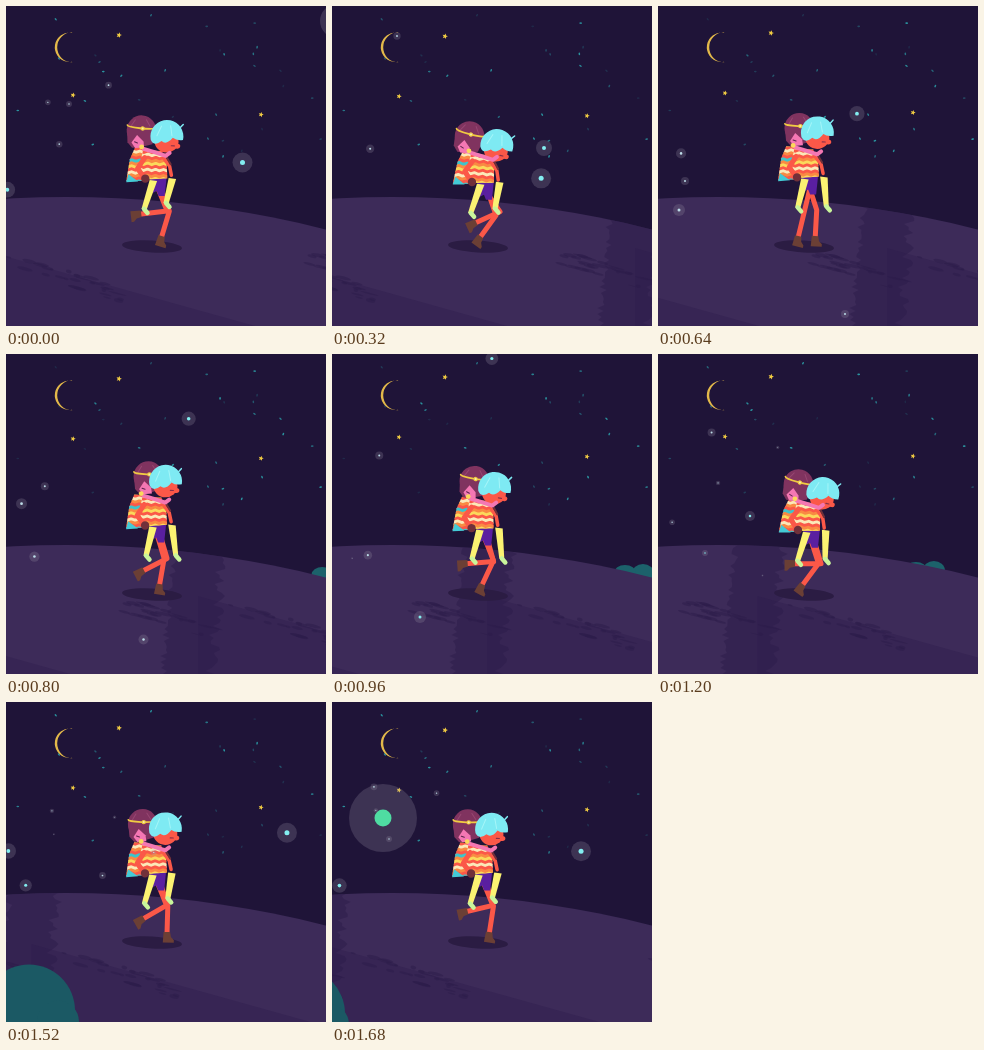
An HTML page with a canvas that plays this animation: 320x320 px, repeating every 1.76 s.

```html
<!DOCTYPE html>
<html>
<head>
<meta charset="utf-8">
<style>
html, body { margin: 0; width: 100%; height: 100%; overflow: hidden; background: #1f1438; }
canvas { display: block; }
</style>
</head>
<body>
<canvas id="stage" width="320" height="320"></canvas>
<script>
const ctx = document.getElementById('stage').getContext('2d');
const TAU = Math.PI * 2, STEP = 80, STEPS = 22;
const RED = '#fb5848', PINK = '#f477b3', BOOT = '#6b3f35', YELLOW = '#f0cb42', SHADE = 'rgba(45,28,74,.5)';

const mod = (a, n) => (a % n + n) % n;
const lerp = (a, b, u) => a + (b - a) * u;
const linear = u => u, easeIn = u => u * u, easeOut = u => 1 - (1 - u) ** 2;
// Waves over the whole loop (two paces) and over one pace, peaking at the given step.
const slow = (k, peak) => Math.cos(TAU * (k - peak) / STEPS);
const quick = (k, peak) => Math.cos(2 * TAU * (k - peak) / STEPS);

function random(seed) {
  return () => (seed = seed * 16807 % 2147483647) / 2147483647;
}
function oval(x, y, rx, ry, color, angle = 0) {
  ctx.fillStyle = color;
  ctx.beginPath();
  ctx.ellipse(x, y, rx, ry, angle, 0, TAU);
  ctx.fill();
}
const disc = (x, y, r, color) => oval(x, y, r, r, color);
function trace(points) {
  ctx.beginPath();
  points.forEach(p => ctx.lineTo(...p));
}
function shape(points, color) {
  trace(points);
  ctx.fillStyle = color;
  ctx.fill();
}
function limb(points, width, color) {
  trace(points);
  ctx.strokeStyle = color;
  ctx.lineWidth = width;
  ctx.lineCap = ctx.lineJoin = 'round';
  ctx.stroke();
}
function within([x, y], angle, draw) {
  ctx.save();
  ctx.translate(x, y);
  ctx.rotate(angle);
  draw();
  ctx.restore();
}

function star(x, y, size) {
  shape(Array.from({ length: 10 }, (_, i) => {
    const r = i % 2 ? size * .45 : size, a = i * TAU / 10 - 1.3;
    return [x + r * Math.cos(a), y + r * Math.sin(a)];
  }), YELLOW);
}

function sky(k) {
  ctx.fillStyle = '#1f1438';
  ctx.fillRect(0, 0, 320, 320);
  const rnd = random(4711);
  for (let i = 0; i < 30; i++) {
    ctx.globalAlpha = .55 + .4 * slow(k, i * 5);
    oval(rnd() * 320, rnd() * 155, 1.4, .8, '#2b9aa4', i);
  }
  ctx.globalAlpha = 1;
  const sway = 4 * slow(k, 3);
  star(113, 26.5 + sway, 2.9);
  star(67, 86.5 + sway, 2.7);
  star(255, 106 + sway, 2.7);
  ctx.beginPath();
  ctx.arc(63.5, 41.3, 14.7, -1.4, 1.4, true);
  ctx.arc(66.2, 41.3, 15, Math.PI / 2, -Math.PI / 2);
  ctx.fillStyle = '#e3b94a';
  ctx.fill();
}

function farBush(k) {
  const x = 302 - 11.7 * (k - 12), y = 231 - k;
  if (k < 10 || k > 18) return;
  oval(x + 9, y, 11, 9, '#1c626b');
  oval(x - 9, y, 11, 8, '#1c626b');
}

function nearBush(k) {
  const x = 23 - 28 * (k - 19), y = 306 + 3.9 * (k - 19.8) ** 2;
  disc(x, y, 46, '#1b5964');
  disc(x + 29, y + 11, 21, '#1b5964');
}

function ground(k) {
  const WIDTH = 407, shift = k * WIDTH / STEPS;
  ctx.save();
  ctx.beginPath();
  ctx.arc(60, 1247, 1056, 0, TAU);
  ctx.fillStyle = '#3d2b59';
  ctx.fill();
  ctx.clip();
  for (const start of [-shift, WIDTH - shift]) {
    const rnd = random(71);
    ctx.save();
    ctx.translate(start, 0);
    const left = [], right = [];
    for (let y = 185; y <= 325; y += 3) {
      const lean = (y - 200) * -.1;
      left.push([-58 + lean + rnd() * 9, y]);
      right.unshift([-12 + lean + rnd() * 14, y]);
    }
    shape(left.concat(right), SHADE);
    shape([[-30, 242], [260, 323], [-30, 323]], 'rgba(45,28,74,.35)');
    for (let i = 0; i < 60; i++) {
      const spread = rnd() + rnd() - 1;
      const x = lerp(75, 345, i % 2) + spread * 75, y = 268 + spread * 22 + rnd() * 16 - 12 * (i % 2);
      oval(x, y, 2 + rnd() * 8, .5 + rnd() * 1.5, SHADE, .25);
    }
    ctx.restore();
  }
  ctx.restore();
  oval(146, 240.5, 30, 6, '#2b1c43', .06);
}

// Ankle on a stride: it slides back on the ground, then swings up behind and forward.
function stride(step) {
  const p = mod(step, STEPS) / 11;
  if (p < 1) return [161 - 21 * p, 232];
  const lift = Math.sin(Math.PI * (p - 1));
  return [140 + 21 * (p - 1) ** 6 - 7 * lift, 232 - 24 * lift ** .8];
}

function leg(hip, ankle) {
  const BONE = 28, dx = ankle[0] - hip[0], dy = ankle[1] - hip[1], reach = Math.hypot(dx, dy);
  const bend = Math.sqrt(Math.max(0, BONE ** 2 - reach ** 2 / 4)) / reach;
  const knee = [hip[0] + dx / 2 + dy * bend, hip[1] + dy / 2 - dx * bend];
  limb([hip, knee, ankle], 5, RED);
  const angle = Math.atan2(ankle[1] - knee[1], ankle[0] - knee[0]) - Math.PI / 2;
  within(ankle, angle, () => shape([[-3.5, -2], [3, -2], [4, 3], [7, 6], [7, 8.5], [-4, 8.5]], BOOT));
}

function stocking(knee, foot) {
  const [kx, ky] = knee, [fx, fy] = foot;
  shape([[kx - 4, ky - 3], [kx + 3.5, ky - 2], [fx + 2.5, fy + 1], [fx - 2.5, fy]], '#fbf272');
  limb([[fx, fy], [fx + 3.5, fy + 4]], 4.5, '#c9f59b');
}

function poncho(outline, colors) {
  ctx.save();
  trace(outline);
  ctx.clip();
  for (let i = 0; i < 15; i++) {
    const points = [];
    for (let x = -36; x <= 20; x += 4) points.push([x, -23 + i * 3 + (x / 4 & 1) * 1.5]);
    limb(points, 4, colors[i % colors.length]);
  }
  ctx.restore();
}

function girlHead() {
  oval(0, 0, 14.8, 15, '#80335f');
  shape([[-14.5, 0], [14.5, 0], [12, 13], [0, 17], [-8, 18], [-13, 13]], '#80335f');
  shape([[-4, 5], [-9, 13], [-5, 18], [4, 17], [3, 11]], PINK);
  limb([[-6, 12], [-3, 13]], 1, '#5c244c');
  limb([[-7, -10], [-11, -3]], 1, '#964772');
  limb([[4, -11], [8, -5]], 1, '#964772');
  ctx.beginPath();
  ctx.ellipse(0, -4, 14.5, 2, 0, .1, Math.PI);
  ctx.strokeStyle = YELLOW;
  ctx.lineWidth = 1.8;
  ctx.stroke();
  disc(1, -2, 2.2, YELLOW);
  disc(1, -2, 1, '#f5efb0');
}

function boyHead() {
  oval(0, 5, 12, 11, RED);
  oval(11, 9, 3, 2.5, RED);
  limb([[5, 9], [8, 9]], 1.2, '#87304a');
  ctx.beginPath();
  ctx.arc(0, 0, 16.5, Math.PI * .92, Math.PI * 2.05);
  ctx.quadraticCurveTo(10, 4, 6, 1);
  ctx.quadraticCurveTo(0, 9, -5, 5);
  ctx.quadraticCurveTo(-12, 11, -15.5, 5);
  ctx.fillStyle = '#7eeaf3';
  ctx.fill();
  limb([[13, -10], [15.5, -13]], 1.5, '#7eeaf3');
  limb([[-6, -10], [-10, 0]], 1, '#a5f5f8');
  limb([[3, -11], [5, -1]], 1, '#a5f5f8');
}

function walkers(k) {
  const bob = quick(k, 3.4), tilt = .13 + .13 * bob;
  const x = 150 + bob, y = 161 + 3 * bob, swing = slow(k, 0);
  const torso = [x, y];
  within(torso, tilt * .3, () => {
    poncho([[-21, -18], [-10, -17], [-10, 15], [-29, 16], [-26, -6]],
      ['#f98a43', '#fbd95b', RED, '#fbe9b8', '#f98a43', RED, '#3ec4cb']);
    shape([[-27, 9], [-17, 16], [-29, 17]], '#44cbd6');
  });
  within([139 - 3.5 * swing, 126 + 4.5 * bob], tilt, girlHead);
  leg([x + 1, y + 19], stride(k - 6));
  leg([x + 4, y + 19], stride(k - 19));
  shape([[x - 6, y + 11], [x + 11, y + 11], [x + 9, y + 30], [x + 3, y + 30], [x + 1, y + 25], [x - 3, y + 27]], '#5a1fa0');
  within(torso, tilt * .3, () => {
    poncho([[-13, -15], [6, -15], [11, -2], [12, 12], [-10, 14], [-16, 0]],
      [RED, '#f98a43', '#fbd95b', RED, '#fbe9b8']);
    limb([[-11, -8], [-18, 3], [-12, 11]], 5, RED);
    disc(-10, 13, 4.2, '#71303a');
    limb([[8, -8], [14, 0], [16, 9]], 3.5, RED);
    limb([[9, -12], [15, -2]], 2, '#71303a');
  });
  stocking([x - 2, y + 17], [139 - swing, y + 43]);
  stocking([x + 17, y + 15], [165 - 5 * swing, y + 40 - 3 * swing]);
  within([162 + 3 * bob, 133 + 7 * bob], tilt * .8, boyHead);
  limb([[x - 12, y - 17], [x - 2, y - 14], [x + 10, y - 10], [x + 14, y - 13]], 4, PINK);
  disc(x - 14, y - 19, 2.4, '#fbd95b');
}

const CYAN = '#83eef0', GREEN = '#4fdca2', WHITE = '#bddce8';
const fly = (color, start, life, from, to, ease = linear) => ({ color, start, life, from, to, ease });
// Ends are [x, y, halo radius].
const flies = [
  fly(CYAN, 17, 10, [322, 107, 10], [208, 173, 10], easeOut),
  fly(CYAN, 4, 9, [212, 142, 8], [146, -32, 6], easeIn),
  fly(GREEN, 20, 3, [-229, 217, 51], [611, -86, 0]),
  fly(WHITE, 21, 13, [57, 137, 3], [8, 152, 6]),
  fly(CYAN, 17, 7, [32, 183, 5], [-11, 184, 9]),
  fly(CYAN, 15, 6, [47, 199, 3], [-20, 124, 10]),
  fly(WHITE, 8, 8, [27, 175, 4], [54, 77, 4], easeOut),
  fly(WHITE, 8, 7, [21, 204, 6], [47, 199, 3]),
  fly(WHITE, 8, 4, [187, 308, 4], [88, 263, 6]),
  fly(CYAN, 12, 6, [88, 263, 6], [96, 61, 4]),
  fly(WHITE, 22, 6, [63, 98, 3], [66, -4, 4]),
];
const rnd = random(97);
for (let i = 0; i < 8; i++) {
  const x = 20 + rnd() * 150, y = 60 + rnd() * 190;
  flies.push(fly(WHITE, 12 + i, 5, [x, y, 1], [x - 10, y - 60, 4]));
}

function firefly({ color, start, life, from, to, ease }, k) {
  const age = mod(k - start, STEPS);
  if (age >= life) return;
  const u = ease(age / life);
  const [x, y, r] = from.map((v, i) => lerp(v, to[i], u));
  disc(x, y, r, 'rgba(150,145,165,.25)');
  disc(x, y, r * .25, color);
}

function frame(now) {
  const k = Math.floor(now / STEP) % STEPS;
  sky(k);
  farBush(k);
  ground(k);
  walkers(k);
  nearBush(k);
  flies.forEach(f => firefly(f, k));
}

const start = performance.now();
function tick() {
  frame(Math.max(0, performance.now() - start));
  requestAnimationFrame(tick);
}
tick();
</script>
</body>
</html>
```
